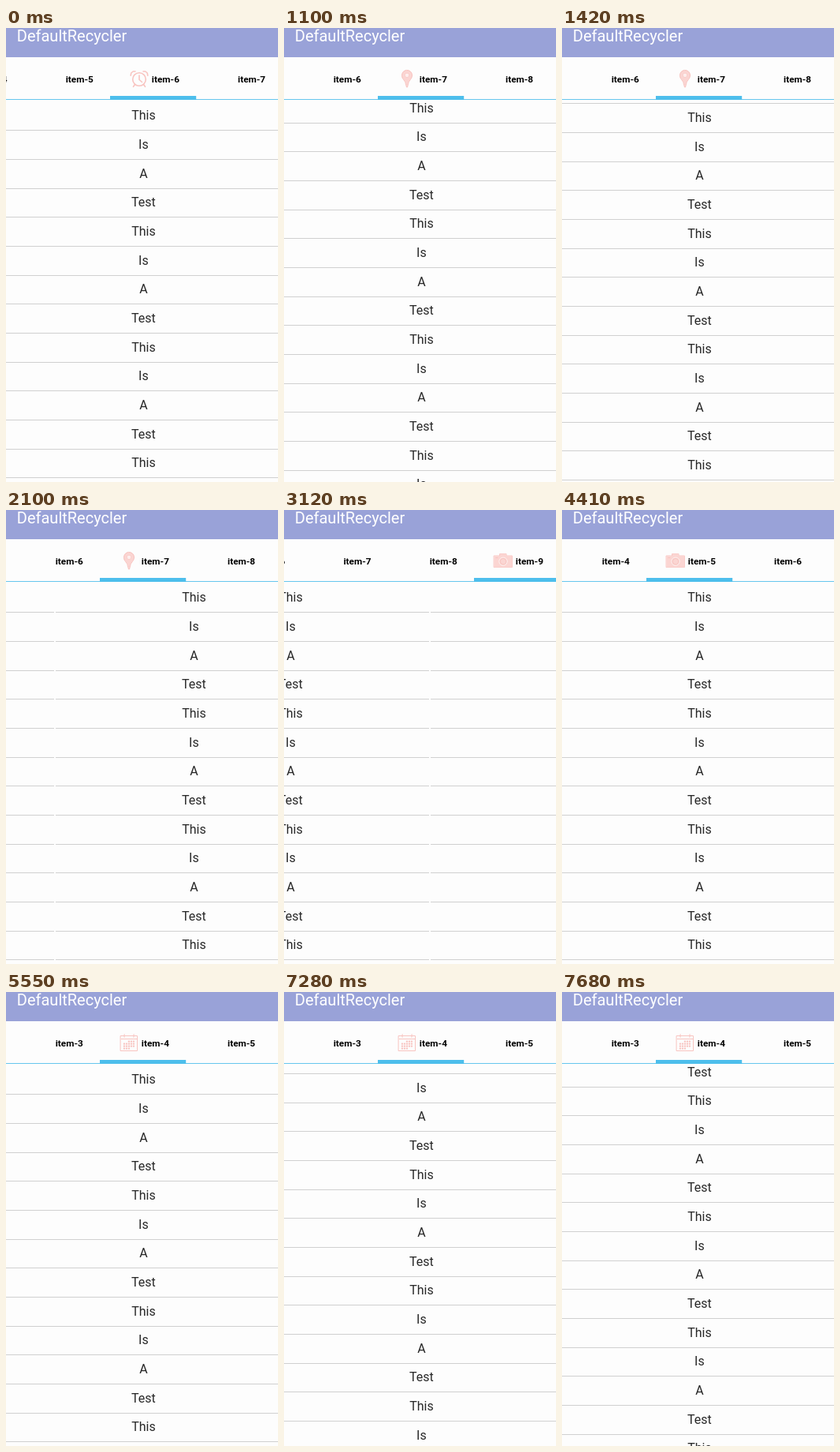
Write an HTML page with a canvas that moves like this. It is 345 by 575 pixels and loops after 8 s.

```html
<!DOCTYPE html>
<html lang="en">
<head>
<meta charset="utf-8">
<title>Tab pager</title>
<style>
  html, body { margin: 0; width: 100%; height: 100%; overflow: hidden; background: #fdfdfd; }
  canvas { display: block; }
</style>
</head>
<body>
<canvas id="stage" width="345" height="575"></canvas>
<script>
const W = 345, H = 575, LOOP = 8000;
const PAGE = 353, TAB = 109.2, ROW = 36.67, LIST_TOP = 91;
const BLUE = '#4dbeec', PINK = '#f8c4c0', PALE = '#fbd5d2';
const WORDS = ['This', 'Is', 'A', 'Test'];
const ctx = document.getElementById('stage').getContext('2d');

// The screen refreshes only at these moments (ms) and holds in between.
const TICKS = [0, 160, 660, 780, 960, 1100, 1240, 1420, 1650, 1830, 2100, 2310, 2610,
  3120, 3280, 3440, 3640, 3820, 4260, 4410, 4990, 5410, 5550, 7280, 7430, 7680];

// A tab gets selected and the strip eases the last `slack` pixels into place.
const SELECTIONS = [
  { at: 0, tab: 6, slack: 13 },
  { at: 660, tab: 7, slack: 1 },
  { at: 2310, tab: 9, slack: 5 },
  { at: 3640, tab: 6, slack: -71 },
  { at: 4410, tab: 5, slack: -12 },
  { at: 5410, tab: 4, slack: -1 }
];

const SWIPES = [
  { at: 1796, ms: 530, dir: -1 },
  { at: 2930, ms: 606, dir: 1 },
  { at: 4233, ms: 170, dir: 1 }
];

const clamp = u => Math.min(1, Math.max(0, u));
const easeOut = u => 1 - (1 - clamp(u)) ** 2;
const lastBefore = (list, t) => list.findLast(e => e.at <= t);

function strip(t) {
  const { at, tab, slack } = lastBefore(SELECTIONS, t);
  const rest = tab === 9 ? 241 : 119;
  return { tab, left: rest + Math.round(slack * Math.exp((at - t) / 25)) };
}

function swipe(t) {
  const s = lastBefore(SWIPES, t);
  return s ? s.dir * Math.round(PAGE * easeOut((t - s.at) / s.ms)) % PAGE : 0;
}

// First list is dragged down and back, the last one is flung upwards.
function scrolled(t) {
  if (t >= 960 && t < 2100) {
    const u = clamp((t - 878) / 740);
    return Math.max(5, 193.2 * Math.sin(Math.PI * u));
  }
  return 123.7 * easeOut((t - 7216) / 570);
}

function rect(x, y, w, h, color) {
  ctx.fillStyle = color;
  ctx.fillRect(x, y, w, h);
}

function text(str, x, y, font, color, align = 'center') {
  ctx.font = font + ' Roboto, sans-serif';
  ctx.fillStyle = color;
  ctx.textAlign = align;
  ctx.fillText(str, x, y);
}

function line(...pts) {
  ctx.beginPath();
  for (let i = 0; i < pts.length; i += 2) ctx.lineTo(pts[i], pts[i + 1]);
  ctx.stroke();
}

function ring(x, y, r) {
  ctx.beginPath();
  ctx.arc(x, y, r, 0, Math.PI * 2);
  ctx.stroke();
}

// Icons are drawn around their own centre.
function calendar() {
  ctx.strokeRect(-10.5, -8.5, 21, 19);
  line(-10, -4.5, 10, -4.5);
  for (const x of [-6, 6]) line(x, -10.5, x, -6.5);
  ctx.fillStyle = PINK;
  for (let i = 2; i < 18; i++) {
    ctx.fillRect(-7.2 + i % 5 * 3, -2.4 + Math.floor(i / 5) * 3, 2.2, 2);
  }
}

function camera() {
  ctx.beginPath();
  ctx.rect(-11.5, -6, 23, 14.5);
  ctx.rect(-4, -8.5, 8, 2.5);
  ctx.stroke();
  ctx.fill();
  ctx.strokeStyle = '#fdf0ef';
  ring(0, 1.2, 5.2);
  ctx.strokeStyle = PINK;
  ring(0, 1.2, 3.8);
  line(-9.5, -3.5, -7, -3.5);
}

function clock() {
  ctx.lineWidth = 1.6;
  ring(0, 1, 8.3);
  line(0, -4, 0, 1.5, 3.5, 4.5);
  for (const s of [-1, 1]) {
    line(s * 5.5, 7.5, s * 7.5, 10.3);
    line(s * 10.8, -3.8, s * 10.2, -7, s * 7.8, -9, s * 5, -9);
  }
}

function pin() {
  ctx.beginPath();
  ctx.arc(0, -4, 6.6, Math.PI * 0.85, Math.PI * 0.15);
  ctx.quadraticCurveTo(1.2, 4, 0.5, 11);
  ctx.lineTo(-0.5, 11);
  ctx.quadraticCurveTo(-1.2, 4, -5.9, -1);
  ctx.fill();
  ctx.stroke();
  ctx.fillStyle = '#fdeeed';
  ring(0, -4.2, 2.4);
  ctx.fill();
}

const ICONS = [calendar, camera, clock, pin];

function icon(i, x, y) {
  ctx.save();
  ctx.translate(x, y);
  ctx.strokeStyle = PINK;
  ctx.fillStyle = PALE;
  ctx.lineWidth = 1;
  ctx.lineCap = ctx.lineJoin = 'round';
  ICONS[i % 4]();
  ctx.restore();
}

function page(x, scroll) {
  const first = Math.floor(scroll / ROW);
  for (let k = first; k < first + 15; k++) {
    const y = k * ROW - scroll;
    rect(x - 1, Math.round(129.2 + y), PAGE - 2, 1, '#d0d0d0');
    text(WORDS[k % 4], x + 174.4, Math.round(116.2 + y), '16px', '#282828');
  }
}

function tabs({ tab, left }) {
  rect(0, 90, W, 1, '#66c6ee');
  rect(left, 86, TAB, 5, BLUE);
  for (let i = 0; i < 10; i++) {
    text('item-' + i, left + (i - tab) * TAB + 70.4, 69, 'bold 11.8px', '#000');
  }
  icon(tab, left + 37, 64);
}

function draw(now) {
  const t = TICKS.findLast(tick => tick <= now % LOOP);
  const shift = swipe(t);
  rect(0, 0, W, H, '#fdfdfd');

  ctx.save();
  ctx.beginPath();
  ctx.rect(0, LIST_TOP, W, H - LIST_TOP);
  ctx.clip();
  page(shift, scrolled(t));
  if (shift) page(shift - Math.sign(shift) * PAGE, 0);
  ctx.restore();

  tabs(strip(t));
  rect(0, 0, W, 37, '#99a2d8');
  text('DefaultRecycler', 13.8, 17, '20px', '#fff', 'left');
}

const start = performance.now();
function tick() {
  draw(performance.now() - start);
  requestAnimationFrame(tick);
}
tick();
</script>
</body>
</html>
```
